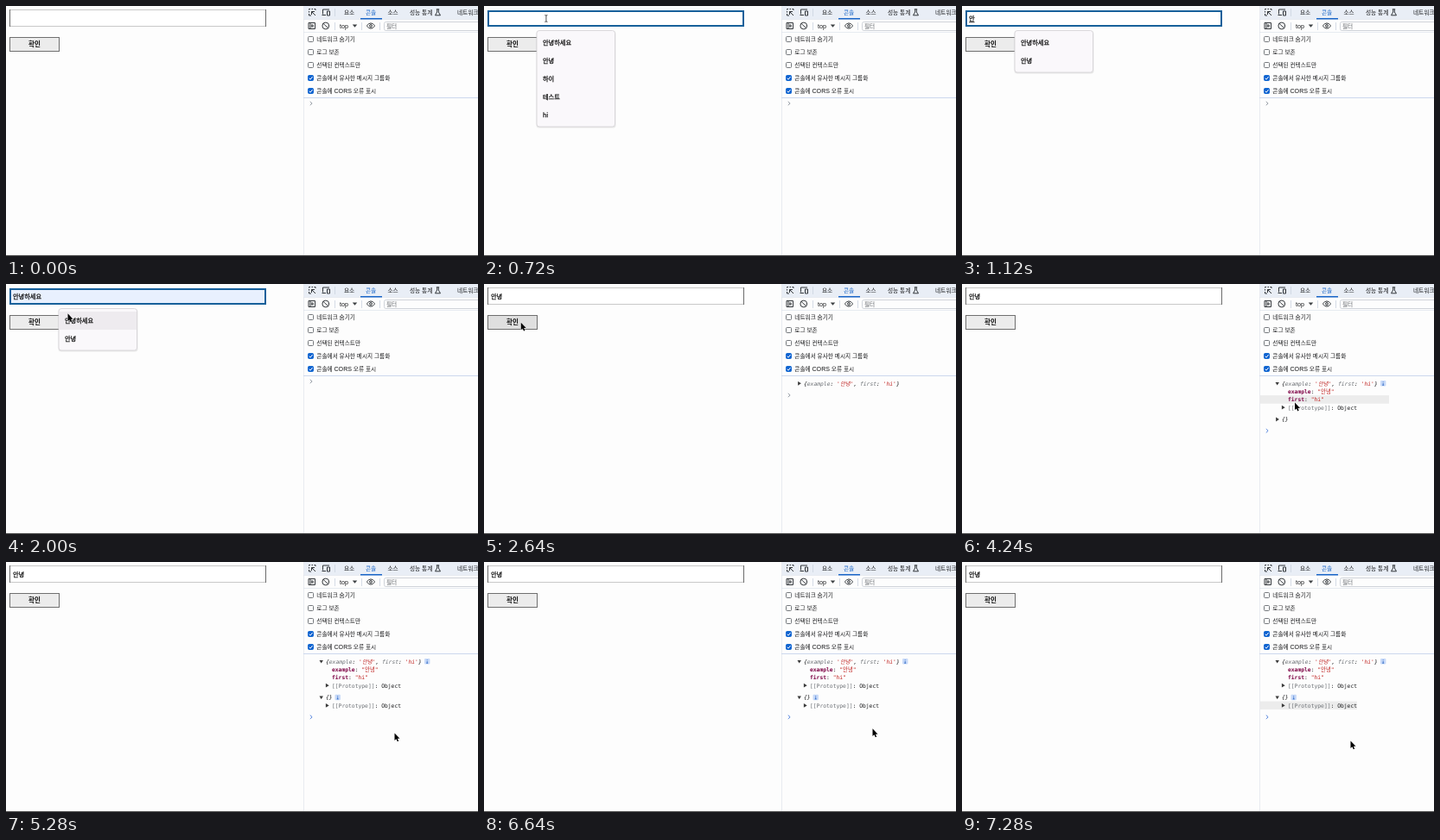
An HTML page that plays this animation: 546 by 290 pixels, repeating every 7360 ms.

```html
<!DOCTYPE html>
<html lang="ko">
<head>
<meta charset="utf-8">
<title>Form and console</title>
<style>
html, body { margin: 0; width: 100%; height: 100%; overflow: hidden; background: #fdfdfd; }
svg { display: block; width: 546px; height: 290px; }
text { font-family: "Noto Sans CJK KR", "Noto Sans CJK", sans-serif; font-size: 6.65px; fill: #17181a; white-space: pre; }
.lat { font-family: "Liberation Sans", sans-serif; font-size: 7.1px; }
.field { font-size: 7.2px; font-weight: 500; fill: #111; stroke: #111; stroke-width: .25; }
.label { font-size: 7.5px; font-weight: 700; fill: #111; }
.mono, .mono tspan { font-family: "DejaVu Sans Mono", "Noto Sans CJK KR", "Noto Sans CJK", monospace; font-size: 6.33px; }
.it { font-style: italic; }
.dim { fill: #6a6e73; }
.str { fill: #bd1a18; }
.key { fill: #7c0043; font-weight: 700; }
.icon { fill: none; stroke: #33373b; stroke-width: 1; }
</style>
</head>
<body>
<svg id="stage" viewBox="0 0 546 290" xmlns="http://www.w3.org/2000/svg">
  <rect width="546" height="290" fill="#fdfdfd"/>

  <rect id="input" x="4" y="4" width="297" height="20"/>
  <path id="edges" d="M4 4.500H301M4 23.500H301" stroke="#c8c8c8"/>
  <path id="sides" d="M4.500 4V24M300.500 4V24" stroke="#6c6c6c"/>
  <rect id="ring" x="5" y="6" width="295" height="17" fill="none" stroke="#17609a" stroke-width="2"/>
  <text id="value" class="field" x="8" y="16.600"></text>
  <path id="compose" stroke="#111" stroke-width=".8"/>
  <rect id="button" x="4.500" y="36.500" width="57" height="16" stroke="#6f6f6f"/>
  <text x="33" y="46.900" text-anchor="middle" class="label">확인</text>

  <rect x="344" width="202" height="15" fill="#e9eef6"/>
  <path d="M344.500 0V290" stroke="#e8ebf1"/>
  <path d="M344 15.500H546M344 30.500H546" stroke="#dfe4ec" stroke-width=".7"/>
  <g class="icon">
    <path d="M353 11H350.500V9M350.500 7.500V6M350.500 4.500V3.500H352M353.500 3.500H355M356.500 3.500H358V5M353.500 6.500L358 11M353.500 10V6.500H357"/>
    <path d="M366.500 9.500V4H374M365.500 10.500H370M371.500 6H374.500V11H371.500Z"/>
    <path d="M497.800 3.800H501.200M498.700 4V7L496.500 10.800H502.500L500.300 7V4"/>
    <path d="M350 19.500H357.500V26.500H350ZM352 19.500V26.500M353.800 21.500L355.800 23 353.800 24.500Z"/>
    <circle cx="369.800" cy="23" r="3.900"/><path d="M367 20.200L372.600 25.800"/>
    <path d="M417.300 23Q422 16.800 426.700 23Q422 29.200 417.300 23Z"/>
    <circle cx="422" cy="23" r="1.400"/>
  </g>
  <path d="M380.500 3V12M380.500 19V28M411.500 19V28M432.500 19V28" stroke="#cbd3e0" stroke-width=".8"/>
  <g id="tabs"></g>
  <rect x="410" y="14" width="25" height="1.500" fill="#1a66c8"/>
  <text class="lat" x="386" y="25.600">top</text>
  <path d="M400.800 21.400H406.200L403.500 24.800Z" fill="#3c4043"/>
  <rect x="437.500" y="18.500" width="120" height="10" rx="2" fill="#fdfdfd" stroke="#c4c9d1" stroke-width=".8"/>
  <text x="440" y="25.500" style="fill:#5f6368">필터</text>
  <g id="options"></g>
  <path d="M344 106.500H546" stroke="#ccd8ee"/>

  <rect id="hover" x="344.500" height="9.500" fill="#ececec"/>
  <g id="console"></g>
  <path id="prompt" fill="none" stroke-width=".9"/>
  <rect y="289" width="546" height="1" fill="#555"/>

  <g id="popup">
    <rect x="60.500" y="29" width="92" rx="3" fill="#000" opacity=".08"/>
    <rect x="61" y="28.500" width="90.500" rx="3" fill="#faf8fb" stroke="#d2d0d4" stroke-width=".8"/>
    <rect id="pick" x="61.400" width="89.700" height="21" fill="#eeebef"/>
    <g id="items"></g>
  </g>

  <path id="arrow" d="M0 0V8.600L1.900 6.900 3.300 9.900 4.700 9.300 3.400 6.400H6Z" fill="#000" stroke="#fff" stroke-width=".7" paint-order="stroke"/>
  <path id="beam" d="M-1.500 -4Q0 -4 0 -3V3Q0 4 -1.500 4M1.500 -4Q0 -4 0 -3M0 3Q0 4 1.500 4" fill="none" stroke="#222" stroke-width=".8"/>
</svg>
<script>
const LOOP = 7360, STEP = 80;
const $ = id => document.getElementById(id);
const show = (id, on) => $(id).setAttribute("display", on ? "inline" : "none");
const set = (id, attrs) => {
  for (const k in attrs) $(id).setAttribute(k, attrs[k]);
};
const span = (cls, s) => `<tspan class="${cls}">${s}</tspan>`;
const line = (x, y, body, cls = "") => `<text class="mono ${cls}" x="${x}" y="${y + 2.3}">${body}</text>`;
const triangle = (x, y, open) =>
  `<path fill="#3c3c3c" d="M${open ? `${x - 2.2} ${y - 1.4}h4.4l-2.2 3.6z` : `${x - 1.6} ${y - 2.4}v4.800l3.800-2.400z`}"/>`;
const badge = (x, y) =>
  `<rect x="${x}" y="${y - 3.2}" width="6.400" height="6.400" rx="1" fill="#c8daf8"/>` +
  `<path d="M${x + 3.2} ${y - .5}v2.500m-1 0h2M${x + 3.2} ${y - 2}v.800" stroke="#2864c4" stroke-width=".8"/>`;

$("tabs").innerHTML = [[391, "요소"], [416, "콘솔"], [441.5, "소스"], [467, "성능 통계"], [522, "네트워크"]]
  .map(([x, s]) => `<text x="${x}" y="9.900"${s === "콘솔" ? ' style="fill:#1a66c8"' : ""}>${s}</text>`).join("");

$("options").innerHTML = [
  "네트워크 숨기기", "로그 보존", "선택된 컨텍스트만",
  "콘솔에서 유사한 메시지 그룹화", `콘솔에 ${span("lat", "CORS")} 오류 표시`
].map((s, i) => {
  const y = 38.7 + 15 * i, on = i > 2;
  return `<rect x="349.500" y="${y - 3.2}" width="6" height="6" rx="1" fill="${on ? "#0b62d0" : "#fff"}" stroke="${on ? "#0b62d0" : "#666a6f"}" stroke-width=".9"/>` +
    (on ? `<path d="M350.700 ${y}l1.400 1.500 2.500-3.200" fill="none" stroke="#fff"/>` : "") +
    `<text x="359.300" y="${y + 2.4}">${s}</text>`;
}).join("");

const words = ["안녕하세요", "안녕", "하이", "테스트", "hi"];
$("items").innerHTML = words.map((s, i) =>
  `<text class="field" x="68" y="${45 + 21 * i}">${s}</text>`).join("");

// Pointer stops: time, x, y
const path = [
  [240, 150, 8], [480, 72, 14], [1840, 71, 20], [2000, 71.5, 34.3], [2160, 74, 59],
  [2240, 74, 60], [2560, 41.5, 43.4], [2720, 44, 46], [3040, 350, 156], [3200, 390, 154],
  [3520, 365, 115], [3680, 365, 115], [4160, 385, 137.5], [4320, 385, 137.5],
  [4640, 365, 157], [4800, 365, 157], [5280, 449.5, 198.4], [6560, 449.5, 198.4],
  [6880, 449.5, 166], [6960, 449.5, 166], [7280, 449.5, 207.4]
];

function pointer(t) {
  const i = path.findIndex(p => p[0] > t);
  if (i < 0) return path[path.length - 1].slice(1);
  if (!i) return path[0].slice(1);
  const [t0, x0, y0] = path[i - 1], [t1, x1, y1] = path[i];
  const u = (t - t0) / (t1 - t0), e = u * u * (3 - 2 * u);
  return [x0 + (x1 - x0) * e, y0 + (y1 - y0) * e];
}

// Typed syllables, then the previewed suggestions
const typing = [[0, ""], [960, "ㅇ"], [1040, "아"], [1120, "안"], [1280, "안ㄴ"], [1360, "안녀"],
  [1520, "안녕"], [2000, "안녕하세요"], [2160, "안녕"]];

function drawForm(t) {
  const focus = t >= 480 && t < 2560, preview = t >= 2000 && t < 2240;
  set("input", { fill: preview ? "#e8f0fe" : "#fff" });
  show("edges", !focus);
  show("sides", !focus);
  show("ring", focus);
  const value = typing.filter(s => s[0] <= t).pop()[1];
  $("value").textContent = value;
  const x = 8 + 6.62 * (value.length - 1);
  set("compose", { d: t >= 960 && t < 2000 ? `M${x} 18.800h6.600` : "" });
  set("button", { fill: t >= 2480 && t < 2800 ? "#dfdfdf" : "#ececec" });

  const all = t >= 640 && t < 960;
  const some = t >= 1120 && t < 1280 || t >= 1520 && t < 2240;
  show("popup", all || some);
  const count = all ? 5 : 2;
  const [shadow, panel] = $("popup").children;
  shadow.setAttribute("height", 7.5 + 21 * count);
  panel.setAttribute("height", 6.5 + 21 * count);
  [...$("items").children].forEach((n, i) => n.setAttribute("display", i < count ? "inline" : "none"));
  show("pick", preview);
  set("pick", { y: t < 2160 ? 32 : 53 });
}

const proto = y => triangle(371.5, y, false) +
  line(377, y, span("dim", "[[Prototype]]") + ": Object");

function drawConsole(t, mx, my) {
  const first = t >= 2640, second = t >= 2720, open1 = t >= 3600, open2 = t >= 4720;
  const y2 = open1 ? 157 : 129;
  let out = "";
  if (first) {
    out += triangle(364.7, 115.3, open1) +
      line(370, 115.3, "{" + span("dim", "example") + ": " + span("str", "'안녕'") + ", " +
        span("dim", "first") + ": " + span("str", "'hi'") + "}", "it");
  }
  if (open1) {
    out += badge(484, 115.3) +
      line(377, 124.7, span("key", "example") + ": " + span("str", '"안녕"')) +
      line(377, 134, span("key", "first") + ": " + span("str", '"hi"')) + proto(143.2);
  }
  if (second) out += triangle(364.7, y2, open2) + line(370, y2, "{}", "it");
  if (open2) out += badge(380.5, y2) + proto(166.4);
  $("console").innerHTML = out;

  const py = !first ? 113 : y2 + (second ? 13.3 : 0) + (open2 ? 9.5 : 0);
  set("prompt", { d: `M351.800 ${py - 2.2}l2.300 2.200-2.300 2.200`, stroke: open1 ? "#3f74d8" : "#8d949e" });

  const rows = [];
  if (open1) rows.push([124.7, 149.5], [134, 149.5], [143.2, 149.5]);
  if (open2) rows.push([166.4, 112.5]);
  let row = rows.find(r => Math.abs(my - r[0]) < 4.8 && mx > 344);
  if (t >= 6720) row = rows[3];
  else if (t >= 4160 && t < 4400) row = rows[1];
  show("hover", !!row);
  if (row) set("hover", { y: row[0] - 4.8, width: row[1] });
}

function draw(now) {
  const t = Math.floor(now % LOOP / STEP) * STEP;
  const [x, y] = pointer(t);
  const visible = t >= 240 && t < 960 || t >= 1840;
  const beam = x < 301 && y > 4 && y < 24;
  drawForm(t);
  drawConsole(t, x, y);
  show("arrow", visible && !beam);
  show("beam", visible && beam);
  for (const id of ["arrow", "beam"]) set(id, { transform: `translate(${x} ${y})` });
}

function tick() {
  draw(performance.now());
  requestAnimationFrame(tick);
}
tick();
</script>
</body>
</html>
```
